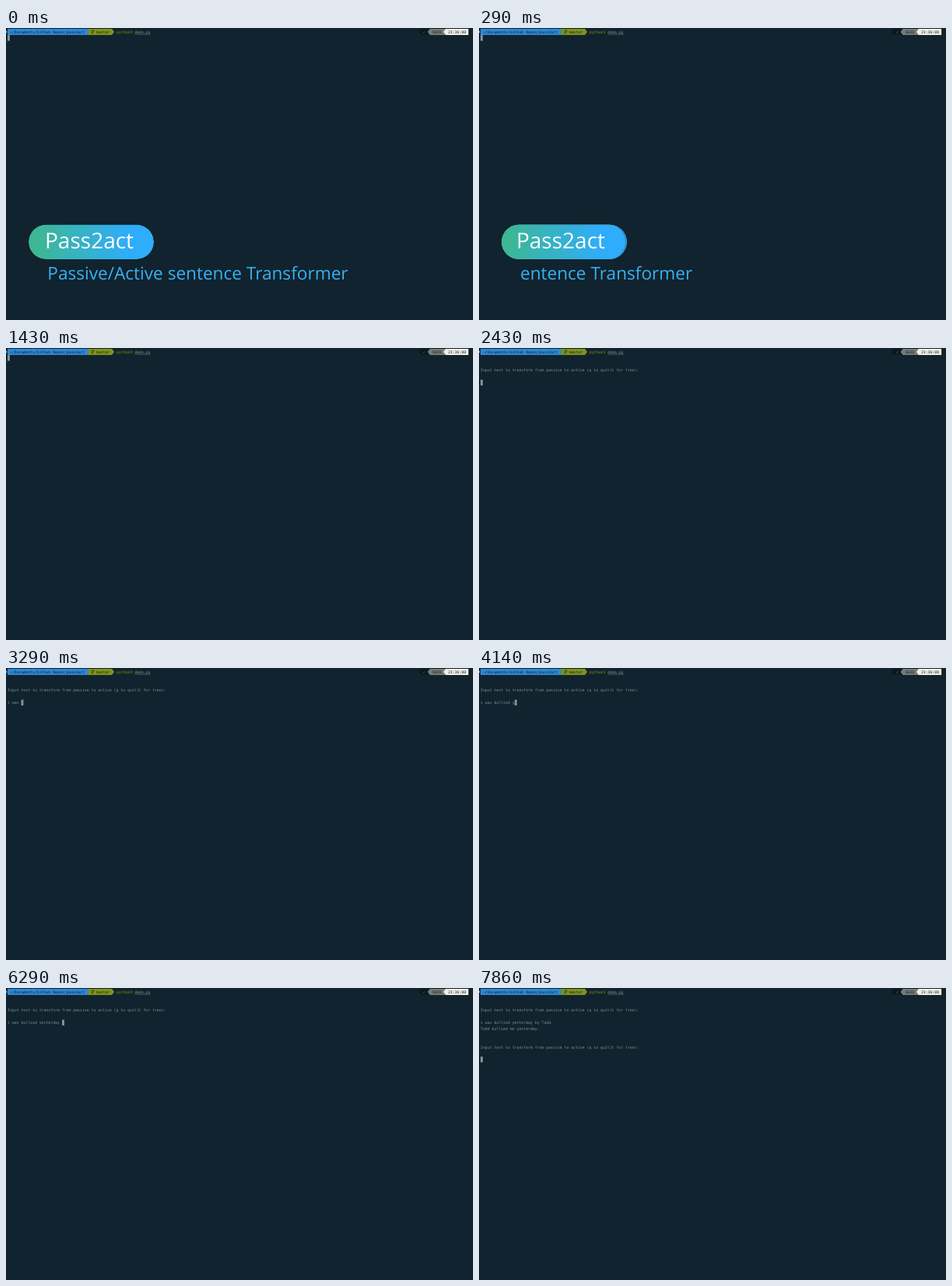
Animation of 600 by 375 pixels, one loop 8000 ms. Source, as an HTML page:

```html
<!DOCTYPE html>
<html lang="en">
<head>
<meta charset="utf-8">
<title>Pass2act demo</title>
<style>
  html, body { margin: 0; width: 100%; height: 100%; overflow: hidden; background: #10232e; }
  svg { display: block; width: 100vw; height: 100vh; }
  text { white-space: pre; text-rendering: geometricPrecision; }
  .mono { font: 4.845px "DejaVu Sans Mono", monospace; }
  .sans { font-family: "Open Sans", "Noto Sans", sans-serif; }
</style>
</head>
<body>
<svg id="stage" viewBox="0 0 600 375">
  <defs>
    <linearGradient id="fade">
      <stop offset="0" stop-color="#3db88c"/>
      <stop offset=".8" stop-color="#2fadfa"/>
    </linearGradient>
    <clipPath id="pillClip"><rect x="29" y="252.5" width="161" height="44.5" rx="22.2"/></clipPath>
    <clipPath id="subClip"><rect x="54" y="298" width="390" height="32"/></clipPath>
  </defs>
  <rect width="600" height="375" fill="#10232e"/>
  <g id="bar"></g>
  <g id="lines"></g>
  <rect id="cursor" width="2.9" height="7.4" fill="#839496"/>
  <g clip-path="url(#pillClip)">
    <g class="layer"><rect x="29" y="252.5" width="161" height="44.5" rx="22.2" fill="#fff"/></g>
    <g class="layer"><rect x="29" y="252.5" width="161" height="44.5" rx="22.2" fill="#2090d2"/></g>
    <g class="layer">
      <rect x="29" y="252.5" width="161" height="44.5" rx="22.2" fill="url(#fade)"/>
      <text class="sans" x="50" y="283" font-size="28" fill="#fff">Pass2act</text>
    </g>
  </g>
  <g clip-path="url(#subClip)">
    <text id="sub" class="sans" x="53.3" y="323" font-size="22.6" fill="#3bb0f2">Passive/Active sentence Transformer</text>
  </g>
</svg>
<script>
const LOOP = 8000, TICK = 1000 / 7;
const CELL = 2.917, ROW = 7.9;
const GREY = '#839496', DARK = '#0c2530', BLUE = '#2d88d6', OLIVE = '#7f921a';
const $ = id => document.getElementById(id);
const colX = c => 2 + c * CELL;
const rowY = r => 1 + r * ROW;

const label = (col, row, str, fill, extra = '') =>
  `<text class="mono" x="${colX(col)}" y="${rowY(row) + 5.6}" fill="${fill}" ${extra}>${str}</text>`;
const shape = (points, fill) => `<polygon points="${points}" fill="${fill}"/>`;

// Prompt segment pointing right (tip after `end`) or left (tip before `start`).
const rightSeg = (start, end, fill) =>
  shape(`${colX(start)},1 ${colX(end)},1 ${colX(end + 1)},5 ${colX(end)},9 ${colX(start)},9`, fill);
const leftSeg = (start, end, fill) =>
  shape(`${colX(end)},1 ${colX(start)},1 ${colX(start - 1)},5 ${colX(start)},9 ${colX(end)},9`, fill);

$('bar').innerHTML =
  shape('0,3.6 1.4,5 0,6.4', '#cdd6d8') +
  rightSeg(35, 46, OLIVE) + rightSeg(0, 35, BLUE) +
  label(1, 0, '~/Documents/Github Repos/pass2act', DARK) +
  `<path d="M110.6 2.2V7.8M110.6 6.2L112.6 4.6V2.4" fill="none" stroke="${DARK}" stroke-width=".7"/>` +
  label(39, 0, 'master', DARK) +
  label(48, 0, 'python3', '#859900') +
  label(56, 0, 'demo.py', GREY) +
  `<rect x="${colX(56)}" y="7.8" width="${7 * CELL}" height=".5" fill="${GREY}"/>` +
  leftSeg(182, 186, '#0a1a22') + leftSeg(186, 193, '#777a78') + leftSeg(193, 203, '#f1efe3') +
  label(183, 0, '✓', '#7f9a5a') +
  label(187, 0, '5638', '#12222a') +
  label(194, 0, '23:36:00', '#12222a', 'font-weight="bold"');

const PROMPT = 'Input text to transform from passive to active (q to quit|t for tree):';
const INPUT = 'i was bullied yesterday by Todd.';
const ANSWER = 'Todd bullied me yesterday.';
const PROMPT_AT = 2000, ENTER_AT = 7140, ANSWER_AT = 7420;

// [time, characters typed], linear in between
const KEYS = [[2430, 0], [3140, 6], [3290, 6], [3570, 11], [4570, 18], [5140, 18], [5710, 24], [6290, 24], [7000, 32]];

function typed(t) {
  if (t <= KEYS[0][0]) return 0;
  for (let i = 1; i < KEYS.length; i++) {
    const [t0, n0] = KEYS[i - 1], [t1, n1] = KEYS[i];
    if (t < t1) return Math.floor(n0 + (n1 - n0) * (t - t0) / (t1 - t0));
  }
  return INPUT.length;
}

function drawTerminal(t) {
  const n = typed(t);
  let row = 1, col = 0, out = '';
  if (t >= PROMPT_AT) {
    out = label(0, 3, PROMPT, GREY) + label(0, 5, INPUT.slice(0, n), GREY);
    row = 5;
    col = n;
  }
  if (t >= ENTER_AT) { row = 6; col = 0; }
  if (t >= ANSWER_AT) {
    out += label(0, 6, ANSWER, GREY) + label(0, 9, PROMPT, GREY);
    row = 11;
  }
  $('lines').innerHTML = out;
  $('cursor').setAttribute('x', colX(col));
  $('cursor').setAttribute('y', rowY(row) + .2);
}

const ease = (t, start, span) => {
  const p = Math.min(1, Math.max(0, (t - start) / span));
  return (1 - Math.cos(Math.PI * p)) / 2;
};

function slide(el, dist, p, hidden) {
  el.setAttribute('transform', `translate(${-dist * p} 0)`);
  el.setAttribute('visibility', hidden || p >= 1 ? 'hidden' : 'visible');
}

const layers = [...document.querySelectorAll('.layer')].reverse();

function drawTitle(t) {
  const resting = ease(t, 235, 700) === 0;
  layers.forEach((el, i) => slide(el, 161, ease(t, 235 + i * 98, 700), i > 0 && resting));
  slide($('sub'), 390, ease(t, 60, 500));
}

function render(now) {
  const t = Math.floor((now % LOOP + 5) / TICK) * TICK % LOOP;
  drawTitle(t);
  drawTerminal(t + 5);
}

const begin = performance.now();
function loop() {
  render(performance.now() - begin);
  requestAnimationFrame(loop);
}
loop();
</script>
</body>
</html>
```
